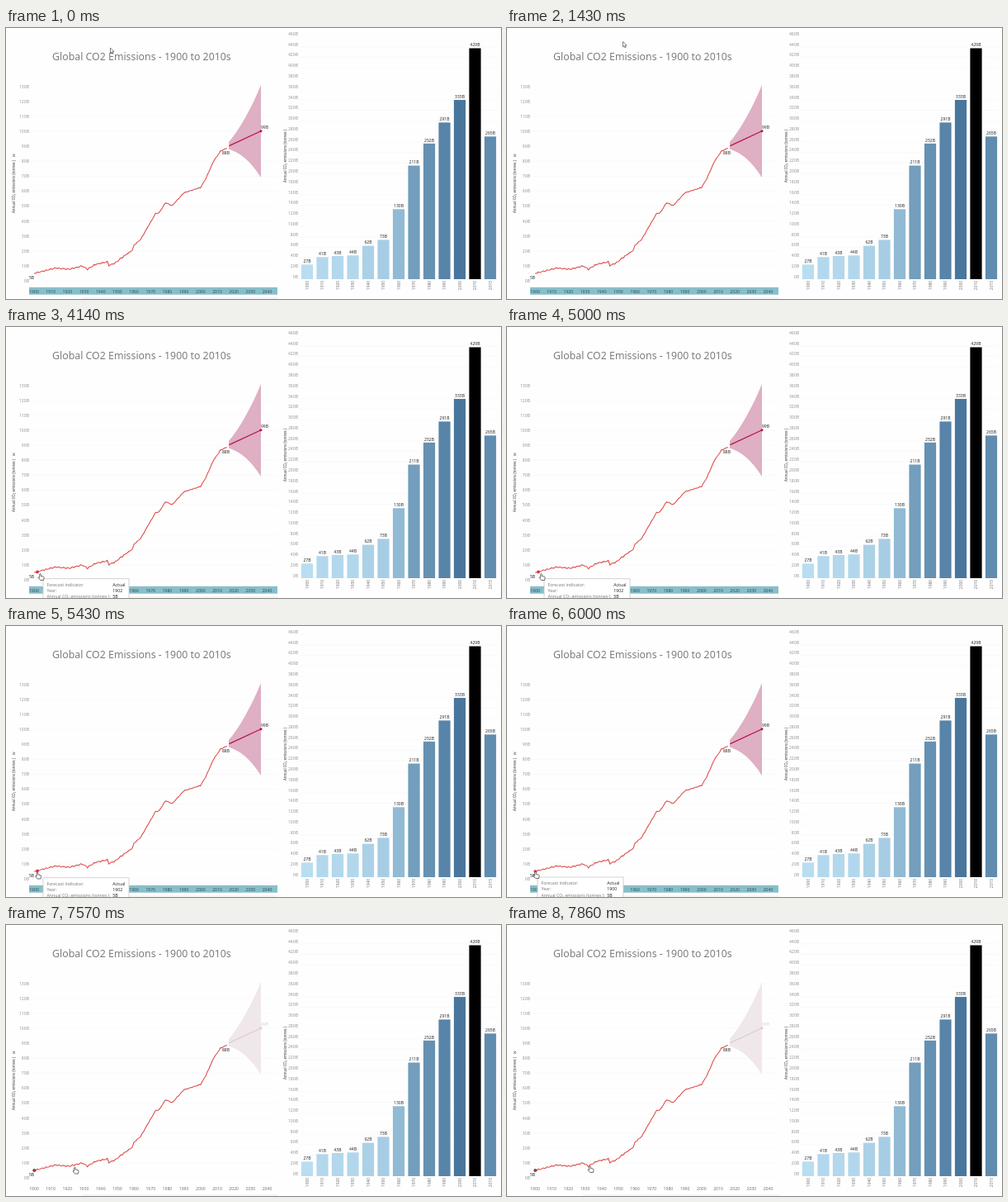
An HTML page for the animation above (8000 ms loop, 600 px wide and 328 px high).

```html
<!DOCTYPE html>
<html lang="en">
<head>
<meta charset="utf-8">
<title>Global CO2 Emissions</title>
<style>
  html, body { margin: 0; width: 100%; height: 100%; overflow: hidden; background: #fefefe; }
  svg { display: block; width: 100%; height: 100%; font-family: "Noto Sans", "Open Sans", sans-serif; }
  .strong { font-weight: 500; }
</style>
</head>
<body>
<svg id="stage" viewBox="0 0 600 328"></svg>
<script>
const LOOP = 8000, STEP = LOOP / 56;
const INK = '#2c2c2c', RED = '#de4f4f', CRIMSON = '#b5124c';
const stage = document.getElementById('stage');

function el(tag, attrs, parent = stage) {
  const node = document.createElementNS('http://www.w3.org/2000/svg', tag);
  for (const key in attrs) node.setAttribute(key, attrs[key]);
  parent.appendChild(node);
  return node;
}

// Text whose capitals are centred on y
function label(str, x, y, size, fill, anchor = 'start', parent = stage, turn = 0) {
  const node = el('text', { x, y: y + size * 0.36, 'font-size': size, fill, 'text-anchor': anchor }, parent);
  if (turn) node.setAttribute('transform', `rotate(${turn} ${x} ${y})`);
  node.textContent = str;
  return node;
}
function strong(...args) {
  const node = label(...args);
  node.setAttribute('class', 'strong');
  return node;
}

const lerp = (a, b, p) => a + (b - a) * p;
const show = (node, on) => node.setAttribute('visibility', on ? 'visible' : 'hidden');
const moveTo = (node, [x, y]) => node.setAttribute('transform', `translate(${x.toFixed(2)} ${y.toFixed(2)})`);

// Position on a path of [at, ...values] stops
function along(stops, at, ease = p => p) {
  let i = 0;
  while (i < stops.length - 2 && at >= stops[i + 1][0]) i++;
  const [a, b] = [stops[i], stops[i + 1]];
  const p = Math.max(0, Math.min(1, (at - a[0]) / (b[0] - a[0])));
  return a.slice(1).map((v, k) => lerp(v, b[k + 1], ease(p)));
}
const smooth = p => p * p * (3 - 2 * p);

// Horizontal grid with its labels
function scale(count, unit, zero, gap, right, end, drop = 0) {
  for (let i = 0; i <= count; i++) {
    const y = zero - i * gap;
    el('path', { d: `M${right + 1} ${y + drop}H${end}`, stroke: '#f7f7f7', 'stroke-width': 0.6 });
    label(i * unit + 'B', right, y, 5.1, '#999', 'end');
  }
}
const axisTitle = (x, y) => strong('Annual CO₂ emissions (tonnes )', x, y, 4.4, '#3c3c3c', 'start', stage, -90);

// ---- Left: line chart with forecast ----
const yearX = year => 34 + (year - 1900) * 2.018;

strong('Global CO2 Emissions - 1900 to 2010s', 56, 35, 12.35, '#7d7d7d');
scale(13, 10, 306, 18.08, 28, 329);
axisTitle(9.5, 224);
el('path', { d: 'M8 155.5L11 153M8.3 153h1M9.8 155.5h1', stroke: '#3c3c3c', 'stroke-width': 0.8 });
el('path', { d: 'M92 327H330', stroke: '#e6e6e6', 'stroke-width': 0.8 });

const band = el('rect', { x: 28, y: 313.8, width: 301, height: 8.9, fill: '#86bfca' });
const years = [];
for (let y = 1900; y <= 2040; y += 10) years.push(strong(y, yearX(y), 318.8, 5.1, '#777', 'middle'));

const cone = el('path', { d: 'M270 138C283 123 297 98 309 69V181C296 160 283 151 270 146.5Z' });
const trend = el('g', {});
el('path', { d: 'M270.5 142.6L309 124.8', 'stroke-width': 1.2 }, trend);
const trendEnd = el('circle', { cx: 309, cy: 124.8, r: 1.1 }, trend);
const farLabel = strong('99B', 313.5, 120.5, 5, INK, 'middle');

// Turning points of the curve; a small ripple fills the years between
const turns = [
  [1900, 297], [1913, 290.5], [1921, 292], [1929, 288], [1932, 292], [1937, 286],
  [1944, 283], [1945, 287.5], [1949, 284], [1952, 279], [1959, 269], [1960, 263],
  [1964, 256], [1973, 224.5], [1975, 224], [1979, 211.5], [1983, 215], [1990, 199.5],
  [2000, 193], [2003, 183], [2008, 160.5], [2010, 155], [2012, 149], [2016, 145.3]
];
let curve = '';
for (let y = 1900; y <= 2016; y++) {
  const ripple = (y < 1955 ? 0.8 : 0.4) * Math.sin((y - 1900) * 2.4);
  curve += `${yearX(y).toFixed(1)},${(along(turns, y)[0] + ripple).toFixed(1)} `;
}
el('polyline', { points: curve, fill: 'none', stroke: RED, 'stroke-width': 1.1, 'stroke-linejoin': 'round' });
strong('5B', 31, 302, 5, INK, 'middle');
strong('88B', 266.5, 151, 5, INK, 'middle');

// ---- Right: bar chart by decade ----
scale(23, 20, 301, 12.78, 354, 596, 3);
axisTitle(338, 187);
[27, 41, 43, 44, 62, 73, 130, 211, 252, 291, 333, 429, 265].forEach((v, i) => {
  const x = 365 + i * 18.5, h = v * 0.6515, dark = (v - 27) / 4.02;
  const bar = el('rect', { x: x - 7.1, y: 304 - h, width: 14.2, height: h });
  bar.style.fill = `color-mix(in oklch, #b9ddf1, #2a5783 ${dark}%)`;
  strong(v + 'B', x, 300 - h, 5, INK, 'middle');
  strong(i < 12 ? 1900 + i * 10 : 2015, x, 311.5, 5, '#7c7c7c', 'middle', stage, -90);
});

// ---- Mark, tooltip and cursors ----
const mark = el('circle', { r: 1.6, fill: '#c9283c', 'stroke-width': 0.7 });

const tip = el('g', {});
el('rect', { width: 104, height: 40, fill: '#fff', stroke: '#c8c8c8', 'stroke-width': 0.8 }, tip);
const rows = el('g', {}, tip);
const values = ['Forecast indicator:', 'Year:', 'Annual CO₂ emissions (tonnes ):'].map((name, i) => {
  const y = 7.3 + i * 7.2;
  label(name, 4.5, y, 5.2, '#7c7c7c', 'start', rows);
  return strong('', 84.3, y, 5.2, INK, 'start', rows);
});
values[0].textContent = 'Actual';
values[2].textContent = '5B';
const tools = el('g', {}, tip);
el('rect', { x: 0.4, y: 0.4, width: 103.2, height: 8.8, fill: '#f0f0f0' }, tools);
el('path', {
  d: 'M6 6l3-3M6 4.5l1.5 2M18.5 3h3v2.5h-3zM20 4.5h3v2.5h-3zM31 3.5h4M31 5h4M31 6.5h4',
  fill: 'none', stroke: '#888', 'stroke-width': 0.7
}, tools);
el('path', { d: 'M24.5 4.3h2.4l-1.2 1.6z', fill: '#555' }, tools);

const arrow = el('path', {
  d: 'M0 0V6.4L1.5 5.1L2.5 7.4L3.6 6.9L2.6 4.7H4.6Z',
  fill: '#fff', stroke: '#333', 'stroke-width': 0.6
});
const hand = el('path', {
  d: 'M-.8 .6Q0-.5 .8 .6V3L4 3.7Q4.8 4 4.6 5L4 8H.2L-2.3 5Q-2.4 3.8-.8 4.8Z',
  fill: '#fff', stroke: '#333', 'stroke-width': 0.7, 'stroke-linejoin': 'round'
});

const arrowPath = [[0, 126.5, 24], [860, 138, 17.5], [1429, 140.5, 16.5]];
const handPath = [[3000, 62, 296], [3714, 41.5, 298.5], [5140, 41.5, 298.5],
  [5714, 34.5, 297.5], [7000, 34.5, 297.5], [7857, 100.5, 291.5]];

function draw(ms) {
  const t = Math.floor((ms + 4) / STEP) * STEP;
  const hover = t >= 3560, atStart = t >= 5560, picked = t >= 6280, withTools = t >= 6420;
  const tipOn = hover && t < 7130;
  const trendColor = picked ? '#d9cdd2' : CRIMSON;

  show(band, !picked);
  years.forEach(y => y.setAttribute('fill', picked ? '#777' : '#36505a'));
  cone.setAttribute('fill', picked ? '#f0e7ea' : '#dfafc3');
  trend.setAttribute('stroke', trendColor);
  trendEnd.setAttribute('fill', trendColor);
  farLabel.setAttribute('fill', picked ? '#dcd3d6' : INK);

  show(mark, hover);
  moveTo(mark, atStart ? [34.3, 297] : [38, 296.5]);
  mark.setAttribute('stroke', picked ? '#333' : RED);

  show(tip, tipOn);
  show(tools, tipOn && withTools);
  moveTo(tip, withTools ? [37, 300] : atStart ? [37, 304] : [45, 304.7]);
  moveTo(rows, [0, withTools ? 9.3 : 0]);
  values[1].textContent = atStart ? '1900' : '1902';

  show(arrow, t < 2130);
  moveTo(arrow, along(arrowPath, t, smooth));
  show(hand, t >= 2990);
  moveTo(hand, along(handPath, t, smooth));
}

const start = performance.now();
function tick() {
  draw((performance.now() - start) % LOOP);
  requestAnimationFrame(tick);
}
tick();
</script>
</body>
</html>
```
